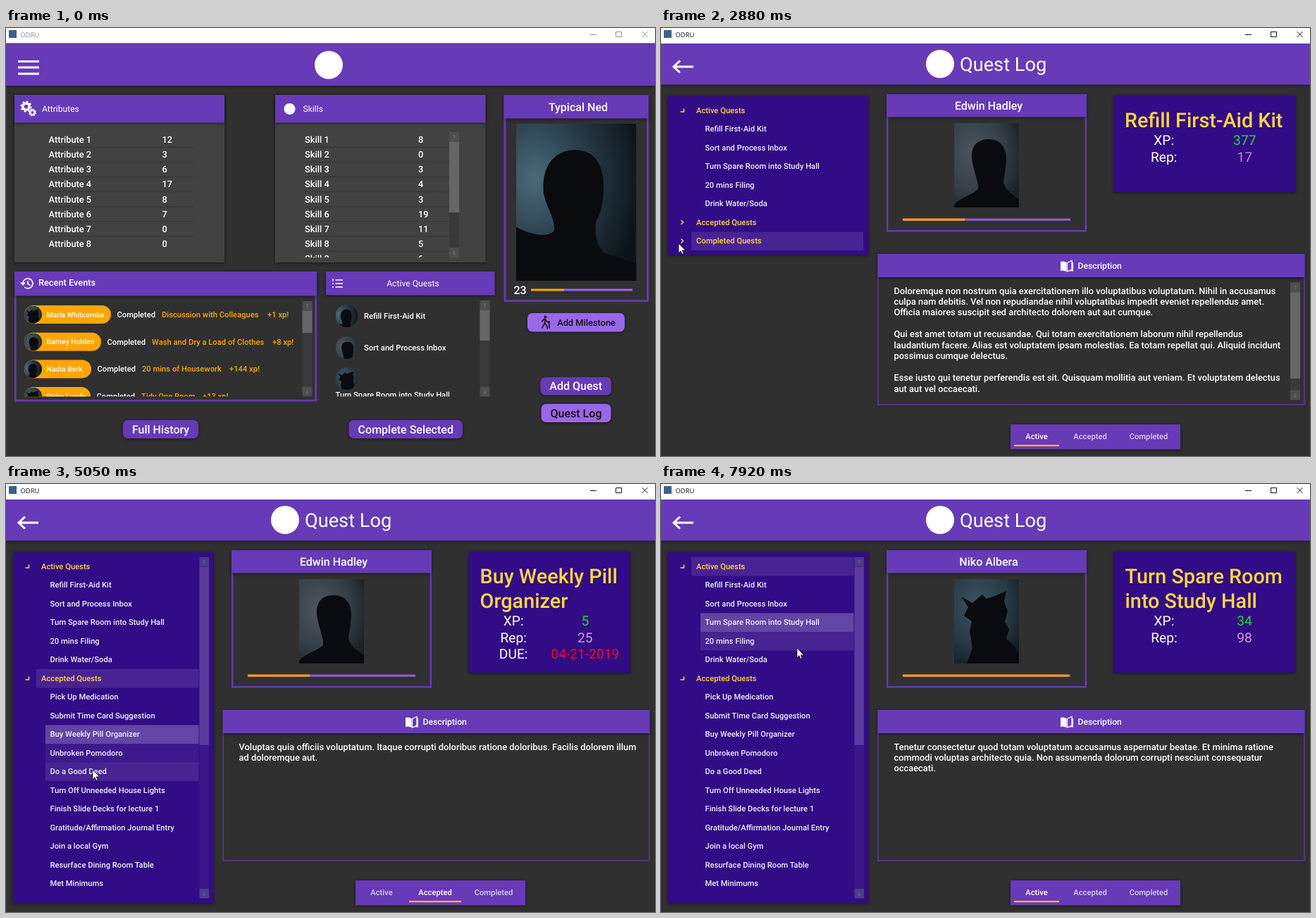
Recreate the animation shown at these times as an HTML page. Size 921 px wide and 608 px high, loop 7990 ms.

```html
<!DOCTYPE html>
<html lang="en">
<head>
<meta charset="utf-8">
<title>Quest Log</title>
<style>
html,body{margin:0;width:100%;height:100%;overflow:hidden;background:#303030}
svg{display:block}
#stage{width:100vw;height:100vh}
text{font-family:Roboto,"Liberation Sans",sans-serif;white-space:pre;text-rendering:geometricPrecision}
.sh{filter:drop-shadow(0 1px 2px rgba(0,0,0,.55))}
</style>
</head>
<body>
<svg id="stage" viewBox="0 0 921 608">
<defs>
<radialGradient id="bgA" cx=".15" cy=".35" r=".9"><stop offset="0" stop-color="#4a6a7a"/><stop offset=".5" stop-color="#263b47"/><stop offset="1" stop-color="#0d1318"/></radialGradient>
<radialGradient id="bgB" cx=".3" cy=".35" r=".8"><stop offset="0" stop-color="#4b565e"/><stop offset=".6" stop-color="#343e46"/><stop offset="1" stop-color="#1c2024"/></radialGradient>
<radialGradient id="bgC" cx=".35" cy=".3" r=".85"><stop offset="0" stop-color="#3c5361"/><stop offset=".6" stop-color="#263843"/><stop offset="1" stop-color="#10181d"/></radialGradient>
<clipPath id="skillClip"><rect x="382" y="134" width="298" height="192"/></clipPath>
<clipPath id="boxClip"><rect x="0" y="380" width="921" height="143.5"/></clipPath>
<clipPath id="treeClip"><rect x="10" y="104" width="284" height="484"/></clipPath>
</defs>
<g id="home"></g>
<g id="log"></g>
<g id="live"></g>
<g id="bar"></g>
<path id="cursor" d="M0 0V13.6L3.1 10.7 5.1 15.3 7.1 14.4 5.2 9.9H9.6Z" fill="#fff" stroke="#111" stroke-width=".8"/>
</svg>
<script>
const LOOP = 7990, ROW = 26.5, TOP = 104;
const PAGE = 1450, BAR_START = 1550, BAR_TIME = 500;
const PURPLE = '#673ab7', LIGHT = '#9a67ea', DEEP = '#320b86', BG = '#303030', CARD = '#424242';
const ORANGE = '#ffa500', YELLOW = '#ffd740', WHITE = '#fff';
const $ = id => document.getElementById(id);
const clamp = v => Math.max(0, Math.min(1, v));

// y is the middle of the capital letters
const text = (x, y, s, size, fill = WHITE, anchor = 'start', weight = 500) =>
  `<text x="${x}" y="${y + size * .355}" font-size="${size}" fill="${fill}" text-anchor="${anchor}" font-weight="${weight}">${s}</text>`;
const mid = (x, y, s, size, fill, weight) => text(x, y, s, size, fill, 'middle', weight);
const rect = (x, y, x2, y2, fill, more = '') =>
  `<rect x="${x}" y="${y}" width="${x2 - x}" height="${y2 - y}" fill="${fill}" ${more}/>`;
const line = (d, color = WHITE, w = 1.6, more = '') =>
  `<path d="${d}" fill="none" stroke="${color}" stroke-width="${w}" ${more}/>`;
const frame = (x, y, x2, y2, w) =>
  rect(x + w / 2, y + w / 2, x2 - w / 2, y2 - w / 2, BG, `stroke="${PURPLE}" stroke-width="${w}"`);
const button = (x, y, x2, y2, s, size, fill, color, cx = (x + x2) / 2) =>
  rect(x, y, x2, y2, fill, 'rx="7" class="sh"') + mid(cx, (y + y2) / 2, s, size, color);

const scroll = (x, y, y2, from, to) =>
  rect(x, y, x + 14, y2, '#3a3a3a') + rect(x, from, x + 14, to, '#666') +
  [y, y2 - 14].map((v, i) => rect(x, v, x + 14, v + 14, '#4e4e4e') +
    line(`M${x + 7} ${v + 4}v6m-2 ${i ? '-2l2 2 2-2' : '-4l2-2 2 2'}`, '#6c6c6c', 1)).join('');

const figures = {
  A: 'M21 53C19 33 29 20 45 20C60 20 67 31 67 48C67 60 65 68 61 75C60 86 62 94 68 99L92 107V120H0V79C10 84 22 88 29 82C30 72 23 64 21 53Z',
  B: 'M25 50C24 32 33 23 49 23C65 23 74 34 74 50C74 64 71 74 70 84C72 94 80 100 92 108V120H0V116C8 106 26 102 34 94C36 86 28 72 25 50Z',
  C: 'M10 25L26 34L40 22L46 28L58 24L74 17L71 32L76 46L72 60L78 72L74 84L86 96L92 108V120H18L26 98L22 74L25 60L14 52L20 40Z'
};
const portrait = (kind, x, y, w, h) =>
  `<svg x="${x}" y="${y}" width="${w}" height="${h}" viewBox="0 0 92 120" preserveAspectRatio="none">` +
  `<rect width="92" height="120" fill="url(#bg${kind})"/><path d="${figures[kind]}" fill="#090b0e"/></svg>`;
const avatar = (kind, x, y, r) => {
  const id = `av${x}_${y}`.replace(/\./g, '-');
  return `<clipPath id="${id}"><circle cx="${x}" cy="${y}" r="${r}"/></clipPath><g clip-path="url(#${id})">` +
    portrait(kind, x - r, y - r, 2 * r, 2.5 * r) + '</g>';
};
const gear = (x, y, r) =>
  `<circle cx="${x}" cy="${y}" r="${r}" fill="none" stroke="#fff" stroke-width="${r * .75}"/>` +
  `<circle cx="${x}" cy="${y}" r="${r * 1.5}" fill="none" stroke="#fff" stroke-width="${r * .5}" stroke-dasharray="${r * .59}"/>`;

function table(x, valueX, name, values) {
  return values.map((v, i) => {
    const y = 158.6 + i * 21.1;
    return text(x, y, `${name} ${i + 1}`, 12.8) + text(valueX, y, v, 12.8) +
      (i < 7 || values.length > 8 ? line(`M${x} ${y + 10.8}H${x + 205}`, '#343434', 1) : '');
  }).join('');
}

function drawHome() {
  const events = [
    [149, 'Marla Whitcombe', 'Discussion with Colleagues', 371, '+1 xp!', 'C'],
    [135, 'Barney Holden', 'Wash and Dry a Load of Clothes', 378, '+8 xp!', 'B'],
    [121, 'Nadia Berk', '20 mins of Housework', 317, '+144 xp!', 'A'],
    [120, 'Petra Lunde', 'Tidy One Room', 279, '+13 xp!', 'C']
  ].map(([end, who, what, xpX, xp, kind], i) => {
    const y = 407 + i * 38.7;
    return rect(26, y - 13, end, y + 13, ORANGE, 'rx="13"') + avatar(kind, 38.5, y, 12.5) +
      text(57.5, y, who, 10.4) + text(end + 8.5, y, 'Completed', 11.2) +
      text(end + 72, y, what, 11.2, ORANGE) + text(xpX, y, xp, 11.2, ORANGE);
  }).join('');
  const quests = [['A', 409, 'Refill First-Aid Kit'], ['B', 454, 'Sort and Process Inbox'], ['C', 498, '']]
    .map(([k, y, s]) => avatar(k, 483.5, y, 16) + text(508, y, s, 11.2)).join('');
  return rect(0, 0, 921, 608, BG) + rect(0, 22, 921, 82, PURPLE, 'class="sh"') +
    line('M17 47.5H47M17 56H47M17 65H47', WHITE, 3) +
    '<circle cx="458" cy="52.5" r="20" fill="#fff"/>' +
    rect(12, 95, 310, 333, CARD, 'class="sh"') + rect(12, 95, 310, 134.5, PURPLE, 'class="sh"') +
    gear(28.5, 111.5, 4.6) + gear(37.5, 120, 3.2) + text(51, 114.5, 'Attributes', 12.1, WHITE, 'start', 400) +
    table(60.5, 221.5, 'Attribute', [12, 3, 6, 17, 8, 7, 0, 0]) +
    rect(382, 95, 680.5, 333, CARD, 'class="sh"') + rect(382, 95, 680.5, 134.5, PURPLE, 'class="sh"') +
    '<circle cx="402.5" cy="115" r="8" fill="#fff"/>' + text(421.5, 114.5, 'Skills', 12.1, WHITE, 'start', 400) +
    `<g clip-path="url(#skillClip)">${table(424, 585, 'Skill', [8, 0, 3, 4, 3, 19, 11, 5, 6])}</g>` +
    scroll(629, 148, 326, 162, 262) +
    frame(12, 346, 441, 530.5, 2.6) + rect(12, 346, 441, 380.5, PURPLE, 'class="sh"') +
    line('M24 363a7 7 0 1 1 2.2 5M21 361.5l3 3.2 3-3.2M31 359v4.5l3.4 2', WHITE, 1.7) +
    text(46, 361, 'Recent Events', 12.8) +
    `<g clip-path="url(#boxClip)">${events}${quests}${text(467.5, 520.8, 'Turn Spare Room into Study Hall', 11.2)}</g>` +
    scroll(420.5, 388, 523.5, 402, 433) +
    rect(454, 346, 693.5, 379.5, PURPLE, 'class="sh"') +
    line('M467.5 358H478M467.5 363H478M467.5 368H478', WHITE, 1.7) +
    line('M464 356v4M463 363h2M463 368h2', WHITE, 1.3) +
    mid(577.5, 363, 'Active Quests', 12.2, WHITE, 400) + scroll(672.5, 387, 523.5, 401, 444) +
    frame(706.5, 95, 912, 389, 2.8) + rect(706.5, 95, 912, 128.5, PURPLE, 'class="sh"') +
    mid(812, 112, 'Typical Ned', 16) + portrait('A', 724, 136, 170.5, 223) +
    text(720.5, 372, '23', 16) + rect(745, 370.5, 792, 373.5, ORANGE) + rect(792, 370.5, 889, 373.5, LIGHT) +
    button(740, 405, 878, 431.5, 'Add Milestone', 12.8, LIGHT, '#111', 823.5) +
    '<circle cx="765.5" cy="410.5" r="1.9" fill="#111"/>' +
    line('M765 413.5l-.5 6-4 7M764.5 419.5l3 3 .8 5M760.5 417.5l3-4 2 .5 2.5 3.5 2 .5M770.8 416v11', '#111', 1.6) +
    button(758.5, 496, 859, 521.5, 'Add Quest', 16, PURPLE) +
    button(759.5, 534, 858.5, 560, 'Quest Log', 16, LIGHT, '#111') +
    button(166, 557, 273, 583, 'Full History', 16, PURPLE) +
    button(486.5, 557, 648, 583, 'Complete Selected', 16, PURPLE);
}

function drawLog() {
  return rect(0, 0, 921, 608, BG) + rect(0, 22, 921, 80.5, PURPLE, 'class="sh"') +
    line('M46 55H18M27 46.5L18 55l9 8.5', WHITE, 3) +
    '<circle cx="396" cy="51" r="20" fill="#fff"/>' + text(424, 51.5, 'Quest Log', 27.2, WHITE, 'start', 400) +
    frame(320, 94, 604, 289.5, 2.4) + rect(320, 94, 604, 126.5, PURPLE, 'class="sh"') +
    frame(307.5, 321, 913.5, 535.5, 1.2) + rect(307.5, 321, 913.5, 354, PURPLE, 'class="sh"') +
    '<path d="M567 332q4.5-1.5 8.5 1v13q-4-2.5-8.5-1z" fill="#fff"/>' +
    line('M576.5 333.5l6.5-3v12.5l-6.5 3zM576.5 346q4-2 7.7-1.2v-12', WHITE, 1.3) +
    text(591.5, 338, 'Description', 12.2) +
    rect(496, 563, 737, 598.5, PURPLE, 'class="sh"');
}

const HELPER = 'Edwin Hadley', OTHER = 'Niko Albera';
const picks = [
  { t: 0, sec: 0, title: ['Refill First-Aid Kit'], w: 258, xp: 377, rep: 17, who: HELPER, scroll: true, body:
    'Doloremque non nostrum quia exercitationem illo voluptatibus voluptatum. Nihil in accusamus|culpa nam debitis. Vel non repudiandae nihil voluptatibus impedit eveniet repellendus amet.|Officia maiores suscipit sed architecto dolorem aut aut cumque.||Qui est amet totam ut recusandae. Qui totam exercitationem laborum nihil repellendus|laudantium facere. Alias est voluptatem ipsam molestias. Ea totam repellat qui. Aliquid incidunt|possimus cumque delectus.||Esse iusto qui tenetur perferendis est sit. Quisquam mollitia aut veniam. Et voluptatem delectus|aut aut vel occaecati.' },
  { t: 4420, sec: 1, title: ['Buy Weekly Pill', 'Organizer'], w: 229, xp: 5, rep: 25, due: '04-21-2019', who: HELPER, body:
    'Voluptas quia officiis voluptatum. Itaque corrupti doloribus ratione doloribus. Facilis dolorem illum|ad doloremque aut.' },
  { t: 5230, sec: 1, title: ['Do a Good Deed'], w: 243, xp: 12, rep: 31, who: HELPER, body:
    'Quos voluptatem sit dolores aut. Et nihil ratione quia molestiae rerum. Vel culpa sed eveniet|necessitatibus iusto.||Autem rerum est consequatur. Nemo aut officia dolorem sit voluptas quae tempore ut. Minima|ea sed voluptatem et dolores.||Animi sint ipsum aut facere. Dolor quia voluptatem est modi.' },
  { t: 6020, sec: 1, title: ['Submit Time Card', 'Suggestion'], w: 264, xp: 40, rep: 22, who: HELPER, body:
    'Animi sint ipsum aut facere. Dolor quia voluptatem est. Modi et eligendi omnis repellat quidem|aut ratione.||Maxime labore non quia sequi.' },
  { t: 6470, sec: 0, title: ['Drink Water/Soda'], w: 261, xp: 21, rep: 43, who: HELPER, body:
    'Ex laboriosam perferendis maxime cumque. Perspiciatis voluptatum amet velit iste. Sunt dolorem|veniam quas repellendus debitis vel eligendi.||Illum consequatur magnam quasi eum laborum ea magni. Fuga rem pariatur unde enim consectetur|perspiciatis. Doloribus maiores autem veniam nihil pariatur optio. Quaerat cum est quae possimus a|natus sint. Cupiditate facilis dolores et consequatur recusandae quasi.' },
  { t: 6790, sec: 0, title: ['Turn Spare Room', 'into Study Hall'], w: 257, xp: 34, rep: 98, who: OTHER, body:
    'Tenetur consectetur quod totam voluptatum accusamus aspernatur beatae. Et minima ratione|commodi voluptas architecto quia. Non assumenda dolorum corrupti nesciunt consequatur|occaecati.' }
];
const pickAt = t => picks.findLastIndex(p => t >= p.t);

const groups = [
  ['Active Quests', 'Refill First-Aid Kit|Sort and Process Inbox|Turn Spare Room into Study Hall|20 mins Filing|Drink Water/Soda'],
  ['Accepted Quests', 'Pick Up Medication|Submit Time Card Suggestion|Buy Weekly Pill Organizer|Unbroken Pomodoro|Do a Good Deed|Turn Off Unneeded House Lights|Finish Slide Decks for lecture 1|Gratitude/Affirmation Journal Entry|Join a local Gym|Resurface Dining Room Table|Met Minimums|Tidy the Desk'],
  ['Completed Quests', 'Send Bid to Company X before July 30|Met Minimums|Tidy One Room|Wash and Dry a Load of Clothes|Buy Weekly Pill Organizer|Discussion with Colleagues|Prepare 1 Document for Client|Do a Good Deed|Join a local Gym|Unbroken Pomodoro|20 mins Filing|Tidy the Desk|Pick Up Medication']
].map(([name, items]) => ({ name, items: items.split('|') }));

// Click times of the two groups that unfold
const OPEN_ACCEPTED = 3870, OPEN_COMPLETED = 3170;

function treeRows(t) {
  const unfold = (start, n) => t < start ? 0 : t < start + 80 ? 3 : n;
  const fade = start => clamp((t - start + 55) / 230);
  const shown = [5, unfold(OPEN_ACCEPTED, 12), unfold(OPEN_COMPLETED, 13)];
  const alpha = [1, fade(OPEN_ACCEPTED), fade(OPEN_COMPLETED)];
  return groups.flatMap((g, sec) => [
    { s: g.name, head: true, sec, open: shown[sec] > 3, a: 1 },
    ...g.items.slice(0, shown[sec]).map(s => ({ s, sec, a: alpha[sec] }))
  ]);
}

const path = [
  [100, 895, 430], [800, 810, 548], [1050, 810, 546], [1730, 738, 412], [1960, 740, 382], [2035, 740, 382],
  [2200, 541, 141], [2420, 200, 122], [2570, 130, 114], [2735, 78, 316], [2890, 25, 306],
  [3110, 25, 306], [3190, 28, 303], [3450, 30, 300], [3810, 28, 276], [3960, 28, 276], [4300, 120, 352],
  [4740, 118, 354], [5047, 123, 406], [5300, 123, 408], [5900, 125, 328], [6150, 125, 328],
  [6440, 126, 249], [6680, 126, 249], [6790, 140, 198], [6870, 140, 198], [7290, 185, 238],
  [7515, 190, 191], [7830, 190, 191], [7915, 193, 233]
];
function cursorAt(t) {
  const i = path.findIndex(p => p[0] > t);
  if (i < 0) return path.at(-1).slice(1);
  if (!i) return path[0].slice(1);
  const [a, b] = [path[i - 1], path[i]], u = (t - a[0]) / (b[0] - a[0]);
  return [a[1] + (b[1] - a[1]) * u, a[2] + (b[2] - a[2]) * u];
}

// Hover fades out: recent pointer places still glow a little
function hoverAlpha(t, i, right) {
  for (let k = 0; k < 7; k++) {
    const [x, y] = cursorAt(t - k * 25);
    if (x > 20 && x < right && Math.floor((y - TOP) / ROW) === i) return .1 * (1 - k / 7);
  }
  return 0;
}
function pickAlpha(t, row) {
  let a = 0;
  picks.forEach((p, i) => {
    if (!i || p.t > t || p.sec !== row.sec || p.title.join(' ') !== row.s) return;
    const end = picks[i + 1] ? picks[i + 1].t : LOOP;
    a = Math.max(a, t < end ? .1 + .14 * clamp((t - p.t) / 200) : .22 * clamp(1 - (t - end) / 325));
  });
  return a;
}

function tree(t) {
  const rows = treeRows(t), full = rows.length > 18;
  const bottom = full ? 595 : 110 + rows.length * ROW, right = full ? 273.5 : 287;
  const p = picks[pickAt(t)];
  let out = rect(10, 97, 294.5, bottom, DEEP, 'class="sh"') + '<g clip-path="url(#treeClip)">';
  rows.slice(0, 19).forEach((r, i) => {
    const y = TOP + i * ROW, c = y + 13;
    let glow = Math.max(hoverAlpha(t, i, right), pickAlpha(t, r));
    const current = p.t ? p.sec : t >= OPEN_ACCEPTED ? 1 : -1;
    if (r.head && r.sec === current) glow = Math.max(glow, .1);
    if (glow) out += rect(r.head ? 43 : 56, y, right, y + ROW, WHITE, `opacity="${glow.toFixed(3)}"`);
    const age = t - p.t;
    if (p.t && r.sec === p.sec && r.s === p.title.join(' ') && age < 400) {
      const [x, cy] = cursorAt(p.t);
      out += `<svg x="56" y="${y}" width="${right - 56}" height="${ROW}"><circle cx="${x - 56}" cy="${cy - y}" r="${age * .3}" fill="#fff" opacity="${.24 * (1 - age / 400)}"/></svg>`;
    }
    if (r.head) out += line(r.open ? `M32.5 ${c - 2.5}v4.5h-5` : `M28.5 ${c - 3}l3 3-3 3`, YELLOW, 1.5);
    out += `<g opacity="${r.a}">${text(r.head ? 50 : 62.5, c, r.s, 11.2, r.head ? YELLOW : '#f1ecf9')}</g>`;
  });
  out += '</g>';
  if (full) {
    const len = 457 * 18.26 / rows.length;
    out += rect(274.5, 104, 288, 588.5, '#3a1689') + rect(274.5, 118, 288, 118 + len, '#5b3c9d');
    out += [104, 575].map((y, i) => rect(274.5, y, 288, y + 13.5, '#4f3a86') +
      line(`M281 ${y + 4}v6m-2 ${i ? '-2l2 2 2-2' : '-4l2-2 2 2'}`, '#6b55a0', 1)).join('');
  }
  return out;
}

function details(p) {
  const n = p.title.length, left = 771 - p.w / 2, off = p.w * .222;
  const facts = [['XP:', p.xp, '#1fdc2f'], ['Rep:', p.rep, p.t ? '#d49ade' : '#bd86d4']];
  if (p.due) facts.push(['DUE:', p.due, '#f5061d']);
  return rect(left, 96.5, left + p.w, 198.5 + n * 34.7, DEEP, 'class="sh"') +
    p.title.map((s, i) => text(left + 16, 130.5 + i * 35, s, 28.8, YELLOW)).join('') +
    facts.map(([k, v, color], i) => {
      const y = 124.5 + n * 35 + i * 23.2;
      return mid(771 - off, y, k, 19.2, WHITE, 400) + mid(771 + off, y, v, 19.2, color, 400);
    }).join('') +
    p.body.split('|').map((s, i) => text(330.5, 373 + i * 15.45, s, 12.85)).join('') +
    (p.scroll ? scroll(893, 361.5, 528.5, 375, 498) : '');
}

function person(t, p) {
  const other = p.who === OTHER;
  const u = clamp((t - (other ? p.t : BAR_START)) / BAR_TIME);
  const len = 238 * u * u * (3 - 2 * u), done = len * (other ? .99 : .37);
  return mid(465, 110.5, p.who, 16) + portrait(other ? 'C' : 'B', 416, 135, 92, 120) +
    rect(343, 270.7, 343 + len, 273.7, '#935fdd') + rect(343, 270.7, 343 + done, 273.7, ORANGE);
}

const tabs = [['Active', 533, 501, 565], ['Accepted', 609, 572, 646], ['Completed', 692, 652, 732]];
const tabBar = sec => tabs.map(([s, x, a, b], i) =>
  mid(x, 580, s, 11.2, i === sec ? WHITE : '#dacdee') + (i === sec ? rect(a, 592, b, 594.3, '#ffb52b') : '')).join('');

function titleBar(active) {
  const c = active ? '#111' : '#8a8a8a';
  return rect(0, 0, 921, 22, WHITE) + (active ? '' : rect(0, 21.5, 921, 22.5, '#453a5c')) +
    rect(4, 3, 15, 14, '#3c5f8f') +
    `<text x="20.5" y="12.8" font-size="9.4" fill="${c}" style="font-family:'Open Sans','Noto Sans',sans-serif">ODRU</text>` +
    line('M829 9.5h9M865.5 5.5h8v7h-8zM902.5 5l8 8m0-8l-8 8', c, 1);
}

const last = {};
function put(id, html) {
  if (last[id] !== html) $(id).innerHTML = last[id] = html;
}

function stepTime(t) {
  const base = t < 3100 ? 100 : 3110, step = 77.5;
  return Math.max(0, base + Math.floor((t - base + 12) / step) * step);
}

function draw(t) {
  const logOpen = t >= PAGE, p = picks[pickAt(t)];
  $('home').style.display = logOpen ? 'none' : '';
  $('log').style.display = logOpen ? '' : 'none';
  put('bar', titleBar(t >= 800));
  put('live', logOpen ? tree(t) + person(t, p) + details(p) + tabBar(p.sec) : '');
  const [x, y] = cursorAt(t);
  $('cursor').setAttribute('transform', `translate(${x.toFixed(1)} ${y.toFixed(1)})`);
  $('cursor').style.display = t < 100 ? 'none' : '';
}

$('home').innerHTML = drawHome();
$('log').innerHTML = drawLog();
const begin = performance.now();
function tick() {
  draw(stepTime((performance.now() - begin) % LOOP));
  requestAnimationFrame(tick);
}
tick();
</script>
</body>
</html>
```
